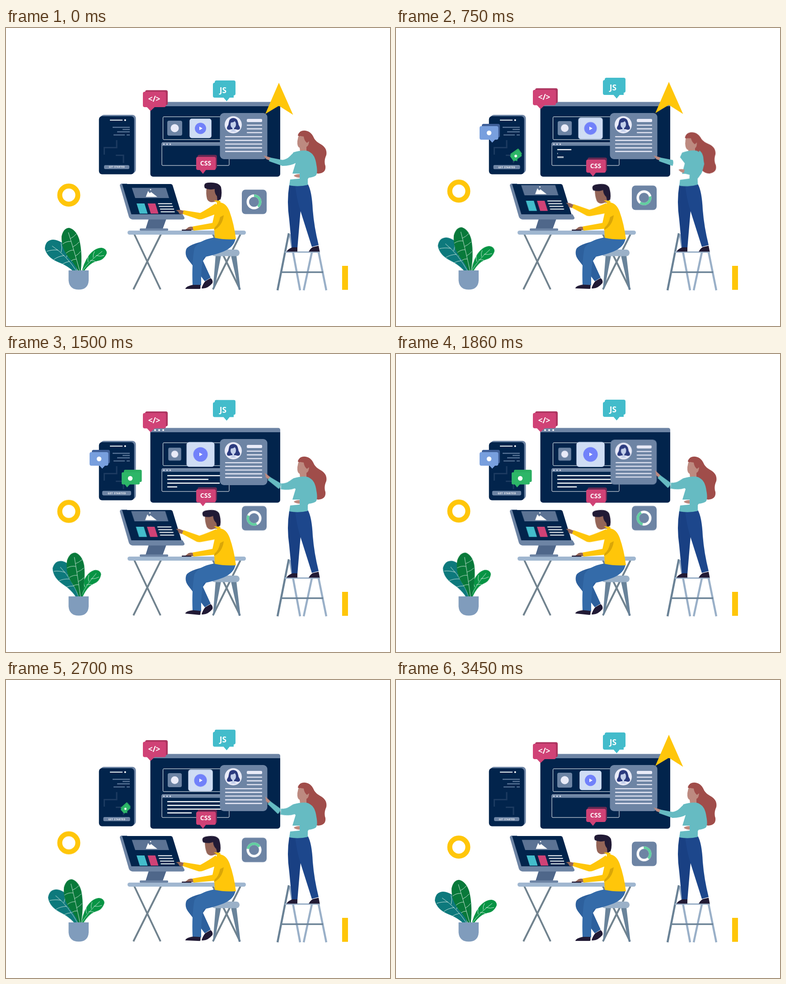
An HTML page for the animation above (3480 ms loop, 850 px wide and 659 px high).

```html
<!DOCTYPE html>
<html lang="en">
<head>
<meta charset="utf-8">
<title>Design team</title>
<style>
html, body { margin: 0; width: 100%; height: 100%; overflow: hidden; background: #fff; }
svg { display: block; width: 850px; height: 659px; }
text { fill: #fff; text-anchor: middle; font-family: "Noto Sans", "Open Sans", sans-serif; font-weight: 600; }

.steel { fill: #6d84a4; } .navy { fill: #02244c; } .gold { fill: #ffc60a; }
.pink { fill: #d04276; } .teal { fill: #43bccb; } .pale { fill: #e9ebf8; }
.shirt { fill: #66bbc2; } .skin { fill: #bd8a80; } .brown { fill: #946558; }
.ink { fill: #211a35; }
.line { fill: none; stroke: #fff; }
.vein { fill: none; stroke: #dcefe6; stroke-width: .9; }

/* slow back-and-forth drift, one full swing per loop */
.sway { animation: sway 1.74s cubic-bezier(.37,0,.63,1) infinite alternate; }
@keyframes sway {
  from { transform: translateY(0) rotate(0deg) scale(1); }
  to { transform: translateY(var(--y, 0px)) rotate(var(--r, 0deg)) scale(var(--s, 1)); }
}
.loop { animation: 3.48s ease-in-out infinite; }

.gauge { animation-name: gauge; animation-timing-function: cubic-bezier(.37,0,.63,1); }
@keyframes gauge { 48.5% { transform: translateY(-22px); } 0%, 100% { transform: translateY(0); } }
.spin { animation-name: spin; animation-timing-function: linear; transform-origin: 549px 384.5px; }
@keyframes spin { from { transform: rotate(0deg); } to { transform: rotate(360deg); } }

.pointer { animation-name: pointer; transform-origin: 604px 165px; }
@keyframes pointer {
  0%, 9.5% { transform: translateY(0) scale(1); animation-timing-function: cubic-bezier(.7,0,.84,0); }
  36.3% { transform: translateY(-98px) scale(1); animation-timing-function: step-start; }
  36.7%, 84% { transform: translateY(0) scale(0); animation-timing-function: ease-out; }
  92%, 100% { transform: translateY(0) scale(1); }
}

.popA { animation-name: popA; transform-origin: 215px 252px; }
@keyframes popA {
  0%, 8.6% { transform: rotate(-80deg) scale(0); }
  17.2%, 63.5% { transform: rotate(0deg) scale(1); }
  71.8%, 100% { transform: rotate(-80deg) scale(0); }
}
.popB { animation-name: popB; transform-origin: 268px 294px; }
@keyframes popB {
  0%, 16.5% { transform: rotate(-80deg) scale(0); }
  26%, 73% { transform: rotate(0deg) scale(1); }
  82%, 100% { transform: rotate(-80deg) scale(0); }
}

.code rect { x: 357px; height: 2.4px; fill: #fff; transform-origin: 357px 0; animation: 3.48s linear infinite; }
@keyframes type1 { 0%, 15.5% { transform: scaleX(0); } 40.5%, 85% { transform: scaleX(1); } 92%, 100% { transform: scaleX(0); } }
@keyframes type2 { 0%, 21.3% { transform: scaleX(0); } 50%, 85% { transform: scaleX(1); } 92%, 100% { transform: scaleX(0); } }
@keyframes type3 { 0%, 18.6% { transform: scaleX(0); } 46%, 85% { transform: scaleX(1); } 92%, 100% { transform: scaleX(0); } }
@keyframes type4 { 0%, 32.6% { transform: scaleX(0); } 58.5%, 85% { transform: scaleX(1); } 92%, 100% { transform: scaleX(0); } }

.card { animation-name: press; transform-origin: 526px 239px; }
@keyframes press { 0%, 48.5%, 59%, 100% { transform: scale(1); } 53.5% { transform: scale(.973); } }

.scroll { animation-name: scroll; }
@keyframes scroll {
  0%, 6%, 74%, 100% { transform: translate(0, 0); }
  17%, 56% { transform: translate(-1.5px, -6px); }
}
.reach { animation-name: reach; transform-origin: 470px 395px; }
@keyframes reach {
  0%, 6%, 70%, 100% { transform: rotate(0deg); }
  17%, 56% { transform: rotate(10deg); }
}
.nod { animation-name: nod; animation-duration: 1.16s; transform-origin: 463px 385px; }
@keyframes nod {
  0%, 8%, 95%, 100% { transform: translateY(0) rotate(0deg); }
  32%, 66% { transform: translateY(2px) rotate(-7deg); }
}

.arm { animation-name: arm; transform-origin: 645px 278px; }
@keyframes arm {
  0%, 35%, 92%, 100% { transform: rotate(0deg); }
  47%, 80% { transform: rotate(12deg); }
}
.fore { animation-name: fore; transform-origin: 612px 298px; }
@keyframes fore {
  0%, 35%, 92%, 100% { transform: translateX(0) rotate(0deg); }
  47%, 80% { transform: translateX(-4px) rotate(13deg); }
}
.upper { animation-name: upper; animation-timing-function: step-end; }
@keyframes upper { 0%, 26% { opacity: 1; } 12% { opacity: 0; } }
.lean { animation-name: lean; transform-origin: 650px 345px; }
@keyframes lean { 0%, 3%, 31%, 100% { transform: rotate(0deg); } 15.5%, 18% { transform: rotate(-2.6deg); } }
.tilt { animation-name: tilt; transform-origin: 657px 270px; }
@keyframes tilt {
  0%, 3%, 31%, 100% { transform: translateY(0) rotate(0deg); }
  15.5%, 18% { transform: translateY(5px) rotate(-5deg); }
}
.fold { animation-name: fold; transform-origin: 680px 285px; }
@keyframes fold { 0%, 3%, 31%, 100% { transform: rotate(0deg); } 15.5%, 18% { transform: rotate(20deg); } }
</style>
</head>
<body>
<svg viewBox="0 0 850 659">
  <rect class="gold" x="744" y="526" width="13" height="53"/>
  <circle class="sway" style="--y:-22.500px" cx="139" cy="369.500" r="20" fill="none" stroke="#ffc60a" stroke-width="11"/>

  <!-- phone -->
  <rect class="steel" x="209" y="192" width="78.500" height="129" rx="8"/>
  <rect class="navy" x="205.700" y="195" width="78" height="128.500" rx="7"/>
  <path class="line" stroke-width="2" d="M230 203.700h28"/>
  <circle cx="263.700" cy="203.800" r="2" fill="#fff"/>
  <path class="line" style="stroke:#607a9c" stroke-width="2.200" d="M236 219.700h38M258 224.300h16M246 229.700h28M238 236.500h25M267 236.500h7"/>
  <path class="line" style="stroke:#1c3a60" stroke-width="3" d="M217.500 280v-15.500h27.500v-16.500M243 281.500h17v17"/>
  <g class="sway" style="--s:1.15;transform-origin:245px 307.500px">
    <rect class="steel" x="217" y="303.200" width="56" height="8.800" rx="3"/>
    <text x="245.500" y="309.500" font-size="4.600" letter-spacing=".55" style="font-weight:800">GET STARTED</text>
  </g>
  <g class="loop popA">
    <rect x="190" y="212" width="40" height="30" rx="4" fill="#3f5f98"/>
    <path fill="#789fde" d="M189 217h33.500q4 0 4 4v22q0 4-4 4h-3.500l-6 6.500-6-6.500h-18q-4 0-4-4v-22q0-4 4-4z"/>
    <circle cx="206" cy="232" r="5.200" fill="#fff"/>
  </g>
  <g class="loop popB">
    <rect x="261" y="256" width="39.500" height="27" rx="3" fill="#2aae61"/>
    <path fill="#2db668" d="M259 261.500h34q3 0 3 3v21q0 3-3 3h-19l-6 6.500-5-6.500h-4q-3 0-3-3v-21q0-3 3-3z"/>
    <circle cx="275" cy="275" r="5.200" fill="#fff"/>
  </g>

  <!-- board -->
  <rect class="navy" x="319.500" y="166" width="287.500" height="162.800" rx="6"/>
  <path class="steel" d="M319.500 173v-5q0-4.500 4.500-4.500h278.500q4.500 0 4.500 4.500v5z"/>
  <g fill="#fff"><circle cx="330" cy="168.300" r="2"/><circle cx="339" cy="168.300" r="2"/><circle cx="348" cy="168.300" r="2"/></g>
  <rect class="line" x="347.500" y="196.300" width="140" height="50.500" rx="2"/>
  <rect class="line" x="345" y="253.500" width="149" height="50.500" rx="2"/>
  <rect class="steel" x="345" y="253.500" width="149" height="7"/>
  <g class="pale"><circle cx="349.500" cy="257" r="1.500"/><circle cx="356.500" cy="257" r="1.500"/><circle cx="363.500" cy="257" r="1.500"/></g>
  <g class="sway" style="--s:.86;transform-origin:373.500px 221.500px">
    <rect class="steel" x="357" y="205" width="33" height="33" rx="4"/>
    <circle class="pale" cx="373.500" cy="221.500" r="9"/>
  </g>
  <g class="sway" style="--s:1.29;transform-origin:430.500px 222px">
    <rect x="406.300" y="200.500" width="48.500" height="43" rx="5" fill="#cfddf4"/>
    <circle cx="430.500" cy="222" r="12.500" fill="#7181fa"/>
  </g>
  <path fill="#fff" d="M428 218l7 4-7 4z"/>
  <g class="code">
    <rect y="267.800" width="128" style="animation-name:type1"/>
    <rect y="276" width="120" style="animation-name:type2"/>
    <rect y="284.400" width="130" style="animation-name:type3"/>
    <rect y="292.700" width="54" style="animation-name:type4"/>
  </g>
  <g class="loop card">
    <rect class="steel" x="473.500" y="188" width="105" height="102" rx="9"/>
    <circle class="pale" cx="503" cy="214" r="19"/>
    <path fill="#2c3b7f" d="M490 224q-2-3 0-6 3-4 3-8 1-11 10-11t11 11q0 4 3 8 2 3 0 6-4 2-8 0h-11q-5 2-8 0z"/>
    <path fill="#c3cfea" d="M498 209q6 0 8-3 3 2 3 7 0 6-4 8v4l5 3q-7 3-14 0l5-3v-4q-4-2-4-8z"/>
    <rect class="pale" x="533" y="201" width="34" height="7" rx="2.500"/>
    <path class="line" style="stroke:#e9ebf8" stroke-width="2.300" stroke-linecap="round" d="M534 214.800h32M534 223h32M534 231.300h32M486 240.300h80M486 248.500h80M486 256.700h80M486 265h80M486 273h80"/>
  </g>

  <path class="gold loop pointer" d="M604 121l31.500 71-31.500-20-30 18z"/>

  <!-- labels -->
  <g class="sway" style="--y:-11px">
    <rect x="308" y="137.500" width="50" height="33" rx="4" fill="#ad3560"/>
    <path class="pink" d="M307 141h43q4 0 4 4v26q0 4-4 4h-21l-9 8.500-8-8.500h-5q-4 0-4-4v-26q0-4 4-4z"/>
    <text x="328" y="163.500" font-size="17.500">&lt;/&gt;</text>
  </g>
  <g class="sway" style="--y:15px">
    <rect x="424" y="280.500" width="43" height="30" rx="4" fill="#692852"/>
    <path class="pink" d="M425 285h35.500q4 0 4 4v21q0 4-4 4h-18l-6.500 8.500-7-8.500h-4q-4 0-4-4v-21q0-4 4-4z"/>
    <text x="442" y="304" font-size="14">CSS</text>
  </g>
  <g class="sway teal" style="--y:-15.300px">
    <rect x="462" y="116" width="46" height="33" rx="4"/>
    <path d="M462 121h42v33h-9l-6.500 8-7-8h-19.500q-4 0-4-4v-25q0-4 4-4z"/>
    <text x="480.500" y="144.500" font-size="17.500">JS</text>
  </g>
  <g class="loop gauge">
    <rect x="522" y="357.500" width="55" height="54" rx="8" class="steel"/>
    <g class="loop spin" fill="none" stroke-width="5.500">
      <circle cx="549" cy="384.500" r="13.700" stroke="#fff"/>
      <circle cx="549" cy="384.500" r="13.700" stroke="#62cfa0" pathLength="360" stroke-dasharray="140 220" transform="rotate(-90 549 384.500)"/>
    </g>
  </g>

  <!-- plant -->
  <g class="sway" style="--r:13deg;transform-origin:160px 560px">
    <path fill="#0d797c" d="M160 550Q143 528 116 518 91 508 86 488 87 469 104 468 124 469 136 489 154 512 160 550z"/>
    <path class="vein" d="M102 482Q133 502 158 540M115 491q-14-1-25 3M129 503q-14 2-23 9M141 516q-10 2-16 6M122 496q3-10 0-20M134 507q3-6 2-16"/>
  </g>
  <g class="sway" style="--r:-13deg;transform-origin:166px 550px">
    <path fill="#079444" d="M166 548Q170 521 184 502 197 486 212 486 223 488 223 498 217 513 203 515 183 519 166 548z"/>
    <path class="vein" d="M213 494Q185 514 168 538M199 503q10 3 18 0M186 514q9 0 14 3M193 508q-1-7 3-14M182 518q-2-6 0-12"/>
  </g>
  <g class="sway" style="--r:8deg;transform-origin:165px 550px">
    <path fill="#08793a" d="M164 550Q157 526 139 508 122 487 123 461 127 442 140 442 155 446 162 467 171 502 164 550z"/>
    <path class="vein" d="M138 452Q150 490 164 540M144 472q-10-1-19 6M150 491q-9 0-17 7M156 511q-7 0-12 4M142 466q8-4 14-11M148 484q8-4 14-11M154 504q6-3 11-10"/>
  </g>
  <path fill="#809cbc" d="M138.500 536h44.500v22q-1 20.500-22 20.500t-22.500-20.500z"/>

  <!-- desk -->
  <g fill="none" stroke="#71838f" stroke-width="4">
    <path d="M284 456l58 122M343 456l-61 122M458 456l60 122M519 456l-61 122"/>
  </g>
  <path fill="#69839a" d="M464 503h12l-14 72-4 4zM498 503h12l9 76h-4z"/>
  <rect x="455" y="490" width="62" height="14.500" rx="7" fill="#9bb1c8"/>
  <rect x="269" y="448" width="262" height="9" rx="4.500" fill="#a0b7d0"/>
  <path fill="#4f678a" d="M316 422h39l-8 22h-38z"/>
  <rect class="steel" x="296" y="443.300" width="63" height="5" rx="2"/>
  <path class="steel" d="M256 344h12l20 68h103l4 7q1 4-4 4.500h-111q-6-1-8-6l-20-69q0-4 4-4.500z"/>
  <path class="navy" d="M257 345h107q4 0 5 3.500l19.500 63.500h-111z"/>
  <g class="loop scroll">
    <path fill="#5c7394" d="M278.500 353.500h75.500l7 22.500h-75z"/>
    <path fill="#fff" d="M309.500 373.500l5-13 4 5 2.500-3 14 11z"/><circle cx="320" cy="357.500" r="1.400" fill="#fff"/>
    <path class="teal" d="M289 388h17.500l7 22.500h-17.500z"/>
    <path class="pink" d="M313.500 388h17l7 22.500h-17z"/>
    <path class="line" stroke-width="2" d="M336.500 388.500h31M338.500 394.500h31M341 400.500h31M342.500 406.500h31"/>
  </g>

  <!-- seated man -->
  <path fill="#2d609d" d="M472 465Q406 475 399 489 395 501 403 512L440 560 453 552 436 515z"/>
  <path fill="#346ba9" d="M508 466L462 463Q427 469 417 487 411 520 413 568L432 569Q431 532 437 507 462 502 482 494 505 484 508 466z"/>
  <path class="ink" d="M433 575q3-9 8-15l12-7q6 5 4 11-11 13-23 12z"/>
  <path class="ink sway" style="--r:6deg;transform-origin:428px 574px" d="M397 577q1-6 17-9h16.500v7q0 2-2 2z"/>
  <path class="brown" d="M416 440q-10-2-14 2l-5 4v1h19z"/>
  <rect class="ink" x="389" y="445.700" width="21.500" height="2.500" rx="1"/>
  <g class="loop nod">
    <path class="brown" d="M444 353h24l4 18-1 15-8-2q-14 4-18-6-3-12-1-25z"/>
    <path class="ink" d="M440 354q-4-11 7-12 24-2 29 10 3 15-1 27l-7 3-1-10q-6-7-5-16-12 3-22-2z"/>
  </g>
  <path class="gold" d="M460 381l14 1 1 4q13 2 20 20 10 28 14 61-24 2-47-3l-1-20-46 4-2-9 44-8 10-45z"/>
  <path fill="#d9a608" d="M482 414q-3 24-22 33l2-6q9-7 12-23z"/>
  <g class="loop reach">
    <path class="gold" d="M464 388q-14 10-34 21l-37-6-3 8 36 12q5 1 10-1l40-15z"/>
    <path class="brown" d="M393 404l-9-2-8 1 5 3 3 5 7 1z"/>
  </g>

  <!-- ladder -->
  <g fill="none" stroke="#9ab0c8" stroke-width="4.500">
    <path d="M628 456l23 124M677 496l-18 84M692 496l17 84"/>
    <path stroke="#6a8296" d="M626 454l-25 126"/>
    <path stroke="#6a8296" stroke-width="3.500" d="M610 540h92"/>
    <path stroke-width="3" d="M617 495.500h78"/>
  </g>

  <!-- standing woman -->
  <path fill="#194083" d="M627 347Q621 384 627 424L633 487 645 487 652 404 655 347z"/>
  <path fill="#1d478c" d="M640 348Q655 350 668 345 677 360 679 402 682 440 692 480L677 484 651 402Q644 380 640 348z"/>
  <path class="ink" d="M621 494.500q3-6 13-9.500h11v9.500zM670 494.500q4-7 9-10l13-3 2.500 13z"/>
  <g class="loop lean">
    <path class="loop tilt" fill="#a04d4a" d="M646 237q4-12 17-10 13 2 19 17 4 7 13 12 17 9 14 25-6 13-2 24 2 16-16 17-20-2-24-34-4-19-2-28z"/>
    <g class="loop tilt">
      <path class="skin" d="M647 240q9-5 19 0l5 8q0 12-6 15l-1 10h-13l-1-8q-6-2-5-15z"/>
      <path fill="#a04d4a" d="M646 238q5-11 20-8l7 19-7 5q-6-5-7-14z"/>
    </g>
    <path class="shirt" d="M636 275Q656 269 668 272 681 277 684 302 678 324 668 334V347Q648 352 627 348L629 335 650 333 651 322 634 322 641 299 631 285z"/>
    <g class="loop fold">
      <path class="skin" d="M651 323q-11 0-14 4 5 4 14 4z"/>
      <path class="shirt" d="M671 274q13 5 16 28 4 20-2 25-11 6-35 4v-9q12-1 19-6l-1-27z"/>
    </g>
  </g>
  <g class="loop arm">
    <path class="loop upper shirt" d="M648 273q-13 2-19 10-8 8-18 9l1 13q19 0 32-8z"/>
    <g class="loop fore">
      <path class="skin" d="M587 287l-9-3-8-2 4 4 2 4 8 3z"/>
      <path class="shirt" d="M585 286.500l28 5.500q2 8-1 13l-30-10.500z"/>
    </g>
  </g>
</svg>
</body>
</html>
```
